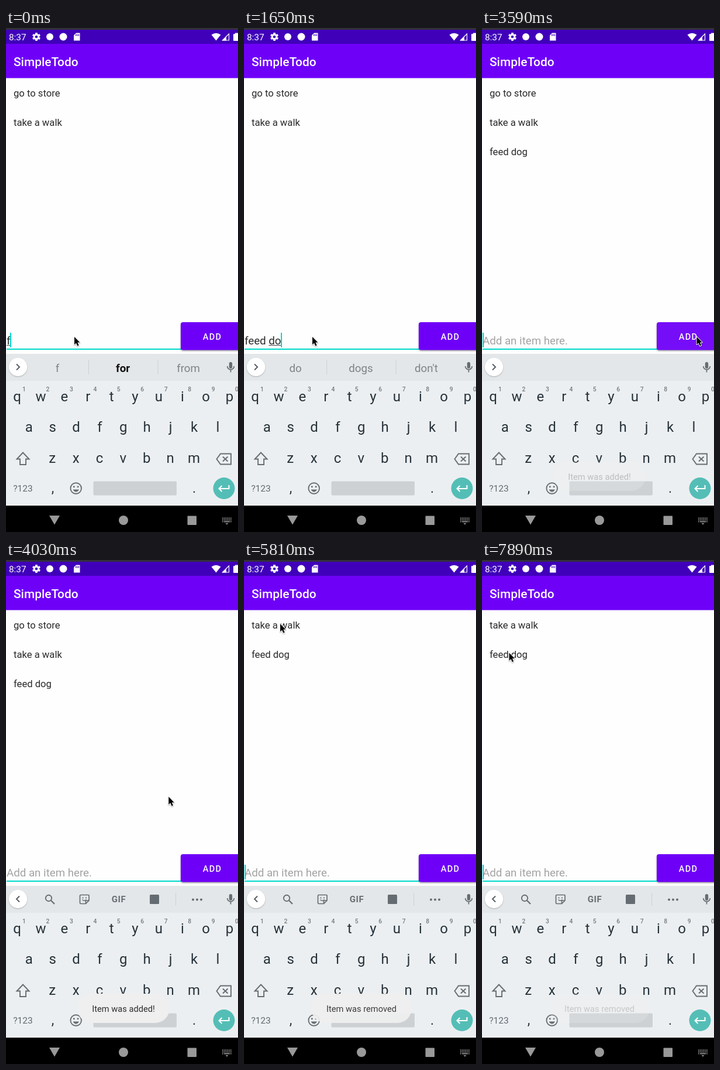
Write an HTML page with a canvas that moves like this. It is 397 px wide and 860 px high and loops after 8 s.

```html
<!DOCTYPE html>
<html lang="en">
<head>
<meta charset="utf-8">
<title>Todo list</title>
<style>
html, body { margin: 0; width: 100%; height: 100%; overflow: hidden; background: #fefefe; }
canvas { display: block; width: 397px; height: 860px; }
</style>
</head>
<body>
<canvas id="stage"></canvas>
<script>
const W = 397, H = 860, LOOP = 8000;
const canvas = document.getElementById('stage');
const dpr = window.devicePixelRatio || 1;
canvas.width = W * dpr;
canvas.height = H * dpr;
const c = canvas.getContext('2d');

const PURPLE = '#6f00f8', TEAL = '#00d8cc', INK = '#26323a', GREY = '#666d72';
const CLEARED = 3440, TOOLS = 3700, REMOVED = 5500;

// start time, text, word being composed, suggestions, bold middle suggestion
const TYPING = [
  [0, 'f', 'f', ['f', 'for', 'from'], true],
  [300, 'fee', 'fee', ['fee', 'feed', 'feel']],
  [600, 'feed', 'feed', ['feed', 'feeds', 'feet']],
  [750, 'feed ', '', ['the', 'me', 'my']],
  [1050, 'feed d', 'd', ['d', 'do', 'day']],
  [1650, 'feed do', 'do', ['do', 'dogs', "don't"]],
  [1950, 'feed dog', 'dog', ['dog', 'DOG', 'dogs']],
  [CLEARED, '', '', []]
];

// time, x, y of the pointer tip
const POINTER = [
  [0, 117, 527], [2420, 117, 527], [3020, 367.5, 527], [3720, 367.5, 527],
  [4600, 62.5, 106.5], [4780, 62.5, 106.5], [5060, 62, 109],
  [5880, 62, 109], [6400, 46.5, 158.5], [LOOP, 46.5, 158.5]
];

const clamp = v => Math.max(0, Math.min(1, v));

function text(s, x, y, size, color, opt = {}) {
  c.font = `${opt.weight || 400} ${size}px Roboto, sans-serif`;
  c.textAlign = opt.align || 'left';
  c.letterSpacing = (opt.spacing || 0) + 'px';
  c.fillStyle = color;
  c.fillText(s, x, y);
  c.letterSpacing = '0px';
}

function rect(x, y, w, h, color) {
  c.fillStyle = color;
  c.fillRect(x, y, w, h);
}

function round(x, y, w, h, r, color) {
  c.beginPath();
  c.roundRect(x, y, w, h, r);
  c.fillStyle = color;
  c.fill();
}

function disc(x, y, r, color) {
  c.beginPath();
  c.arc(x, y, r, 0, Math.PI * 2);
  c.fillStyle = color;
  c.fill();
}

function ring(x, y, r, color, width) {
  c.beginPath();
  c.arc(x, y, r, 0, Math.PI * 2);
  c.strokeStyle = color;
  c.lineWidth = width;
  c.stroke();
}

function fillPath(d, color) {
  c.fillStyle = color;
  c.fill(new Path2D(d));
}

function strokePath(d, color, width) {
  c.strokeStyle = color;
  c.lineWidth = width;
  c.stroke(new Path2D(d));
}

function shadowed(blur, y, color, draw) {
  c.save();
  c.shadowBlur = blur * dpr;
  c.shadowOffsetY = y * dpr;
  c.shadowColor = color;
  draw();
  c.restore();
}

function drawGear(x, y) {
  c.save();
  c.translate(x, y);
  for (let i = 0; i < 6; i++) {
    rect(-1.8, -7, 3.6, 4, '#fff');
    c.rotate(Math.PI / 3);
  }
  c.restore();
  ring(x, y, 3.8, '#fff', 3);
}

function drawTopBars() {
  rect(0, 0, W, 27, '#4000ba');
  rect(0, 0, W, 3, '#33303a');
  text('8:37', 5, 21, 15.3, '#fff');
  drawGear(52, 15);
  disc(75, 15, 6, '#fff');
  disc(98, 15, 6.5, '#fff');
  fillPath('M120 8.5H126.5V21.5H116V12.5Z', '#fff');
  for (let i = 0; i < 3; i++) rect(119 + i * 2.4, 10.5, 1.2, 3, '#4000ba');
  fillPath('M359.5 21.5L351.5 11.5Q359.5 6 367.5 11.5Z', '#fff');
  strokePath('M370.5 21H381.5V10Z', '#fff', 1.2);
  fillPath('M370 21.5L377 14.5V21.5Z', '#fff');
  round(389, 10, 10, 12, 1, '#fff');
  rect(392, 8.5, 5, 2, '#fff');

  rect(0, 27, W, 58.5, PURPLE);
  text('SimpleTodo', 13, 65, 20.9, '#fff', { weight: 500 });
}

function drawList(t) {
  const items = ['go to store', 'take a walk'];
  if (t >= CLEARED) items.push('feed dog');
  if (t >= REMOVED) items.shift();
  items.forEach((s, i) => text(s, 13, 117.3 + i * 50, 16.64, '#292929'));
}

function drawInput(t, state) {
  const [start, value, word] = state;
  const size = 18.72, base = 539.5;
  rect(1, 547, 299, 2, TEAL);
  if (value) text(value, 1, base, size, '#2a2a2a');
  else if (t >= CLEARED) text('Add an item here.', 1, base, size, '#a3a3a3');
  c.font = `400 ${size}px Roboto, sans-serif`;
  const end = 1 + c.measureText(value).width;
  if (word) {
    const w = c.measureText(word).width;
    rect(end - w, 541, w, 1, '#444');
  }
  if (Math.floor((t - start) / 500) % 2 === 0) rect(end - (value ? 0.5 : 0), 520, 2, 25, TEAL);
}

function drawButton(t) {
  shadowed(3, 1.5, 'rgba(0,0,0,.4)', () => round(299, 502, 110, 47.5, 4, PURPLE));
  if (t > 3280 && t < TOOLS) round(299, 502, 110, 47.5, 4, 'rgba(255,255,255,.05)');
  text('ADD', 336.7, 531.6, 14.56, '#fff', { weight: 500, spacing: 1.3 });
}

function drawMic(x, y) {
  round(x - 2.7, y - 8.5, 5.4, 11, 2.7, GREY);
  strokePath(`M${x - 5.8} ${y - 1.5}a5.8 5.8 0 0 0 11.6 0M${x} ${y + 4}v5`, GREY, 1.7);
}

function drawDog() {
  const fur = '#f5bd4f';
  strokePath('M207 580Q212 578 209 572', fur, 2.6);
  c.beginPath();
  c.ellipse(201, 581, 7, 4, 0, 0, Math.PI * 2);
  c.fillStyle = fur;
  c.fill();
  for (const x of [194.5, 198, 203.5, 206]) rect(x, 582, 2, 8, fur);
  disc(195, 575.5, 4.6, fur);
  fillPath('M191 573L191.5 569L195 571ZM196 571L199 569V574Z', '#d89436');
  disc(193, 577.5, 2.4, '#fff1cf');
  disc(192, 576.8, 0.9, '#4a3524');
  disc(195.5, 574.5, 0.7, '#4a3524');
  strokePath('M196.5 579.5L200 581', '#d6453d', 1.5);
}

function drawTools() {
  ring(73, 577, 5.2, GREY, 1.9);
  strokePath('M76.8 580.8L83 587', GREY, 2.2);

  strokePath('M128 571.5H141Q142 571.5 142 572.5V581L136.5 586.5H128Q126.5 586.5 126.5 585V573Q126.5 571.5 128 571.5ZM142 581H136.5V586.5', GREY, 1.7);
  disc(131.5, 576.5, 1.1, GREY);
  disc(137, 576.5, 1.1, GREY);
  strokePath('M130.5 579.5Q134 583 137.5 579.5', GREY, 1.4);

  text('GIF', 193, 584, 15, GREY, { weight: 700, align: 'center', spacing: 0.5 });
  round(246, 571, 16, 16, 1.5, GREY);
  rect(290, 568, 1, 22, '#cdd1d4');
  for (let i = -1; i <= 1; i++) disc(327 + i * 7, 579.5, 2, GREY);
}

function drawStrip(t, state) {
  const words = state[3], bold = state[4], open = t >= TOOLS;
  rect(0, 556, W, 46, '#e4e7e9');
  shadowed(2, 1, 'rgba(0,0,0,.25)', () => disc(20.5, 578.5, 15.7, '#fff'));
  strokePath(open ? 'M23 573.5L18 578.5L23 583.5' : 'M18 573.5L23 578.5L18 583.5', '#555b60', 1.9);
  drawMic(384.5, 578.5);
  if (open) return drawTools();
  words.forEach((s, i) => {
    const x = 88 + i * 112;
    if (s === 'DOG') return drawDog();
    const strong = bold && i === 1;
    text(s, x, 586.5, 18.72, strong ? '#111' : '#7c8387', { align: 'center', weight: strong ? 700 : 400 });
  });
  if (words.length) {
    rect(141, 566, 1, 25, '#cdd1d4');
    rect(259.5, 566, 1, 25, '#cdd1d4');
  }
}

function keyRow(keys, x, y) {
  [...keys].forEach((k, i) => text(k, x + i * 40.4, y, 24, INK, { align: 'center' }));
}

function drawKeys() {
  rect(0, 602, W, 213, '#eceff1');
  keyRow('qwertyuiop', 19, 636.5);
  [...'1234567890'].forEach((k, i) =>
    text(k, 31 + i * 40.45, 619.5, 10.3, '#747b80', { align: 'center', weight: 500 }));
  keyRow('asdfghjkl', 39.2, 689);
  keyRow('zxcvbnm', 79.2, 741.5);

  strokePath('M29 724.5L39.5 735.5H34V745H24V735.5H18.5Z', GREY, 1.9);
  strokePath('M367 726.5H385V744.5H367L360.5 735.5ZM371 731.5L379.5 739.5M379.5 731.5L371 739.5', GREY, 1.9);

  text('?123', 29, 791, 15.5, '#616b71', { align: 'center' });
  text(',', 80, 793, 23, INK, { align: 'center' });
  text('.', 322, 793, 23, INK, { align: 'center' });
  ring(119.7, 785.5, 9.3, GREY, 1.9);
  disc(116.3, 782.8, 1.5, GREY);
  disc(123.1, 782.8, 1.5, GREY);
  fillPath('M114.5 787.5H125Q123 791.5 119.7 791.5Q116.5 791.5 114.5 787.5Z', GREY);
  round(149.5, 773.5, 142.5, 24, 2, '#cdd1d4');
  disc(373, 785.5, 18.5, '#54beb6');
  strokePath('M381.5 780V786H365M369.5 781L364.5 786L369.5 791', '#fff', 2);
}

function drawNav() {
  const grey = '#999';
  rect(0, 815, W, 45, '#000');
  fillPath('M74 832H92L83 847.5Z', grey);
  disc(201, 840, 8, grey);
  round(310.5, 832.5, 15.5, 15.5, 1, grey);
  for (let i = 0; i < 12; i++) rect(370 + (i % 6) * 2.8, 835.5 + Math.floor(i / 6) * 3, 1.7, 1.8, grey);
  rect(370, 841.5, 1.7, 1.8, grey);
  rect(373, 841.5, 10, 1.8, grey);
  rect(384, 841.5, 1.7, 1.8, grey);
  fillPath('M375.5 845H380.5L378 847.5Z', grey);
}

function drawToast(s, half, alpha) {
  if (alpha <= 0) return;
  c.globalAlpha = alpha;
  round(201 - half, 740, half * 2, 50, 25, '#efefef');
  text(s, 201, 771, 14.65, '#2d2d2d', { align: 'center' });
  c.globalAlpha = 1;
}

function drawToasts(t) {
  drawToast('Item was added!', 79, Math.min(clamp((t - 3500) / 350), clamp(1 - (t - 5440) / 200)));
  drawToast('Item was removed', 86, Math.min(clamp((t - 5490) / 350), clamp(1 - (t - 7540) / 440)));
}

function drawPointer(t) {
  const i = POINTER.findIndex(p => p[0] > t);
  const [t0, x0, y0] = POINTER[i - 1], [t1, x1, y1] = POINTER[i];
  const u = (t - t0) / (t1 - t0), e = u * u * (3 - 2 * u);
  c.save();
  c.translate(x0 + (x1 - x0) * e, y0 + (y1 - y0) * e);
  const arrow = 'M0 0V13.2L3 10.5L5.3 15.6L7.6 14.6L5.4 9.6H9.4Z';
  c.lineJoin = 'round';
  shadowed(2, 1, 'rgba(0,0,0,.35)', () => strokePath(arrow, '#fff', 1.8));
  fillPath(arrow, '#000');
  c.restore();
}

// The screen refreshes in coarse steps.
function snap(t) {
  if (t < 3145) return Math.floor(t / 150) * 150;
  const step = 148.28;
  return 3590 + Math.floor((t + 5 - 3590) / step) * step;
}

function draw(now) {
  const t = snap(now % LOOP);
  const state = TYPING.filter(s => s[0] <= t).pop();
  c.setTransform(dpr, 0, 0, dpr, 0, 0);
  rect(0, 0, W, H, '#fefefe');
  drawTopBars();
  drawList(t);
  drawInput(t, state);
  drawButton(t);
  drawStrip(t, state);
  drawKeys();
  drawToasts(t);
  drawNav();
  drawPointer(t);
}

const begin = performance.now();
function tick() {
  draw(performance.now() - begin);
  requestAnimationFrame(tick);
}
tick();
</script>
</body>
</html>
```
